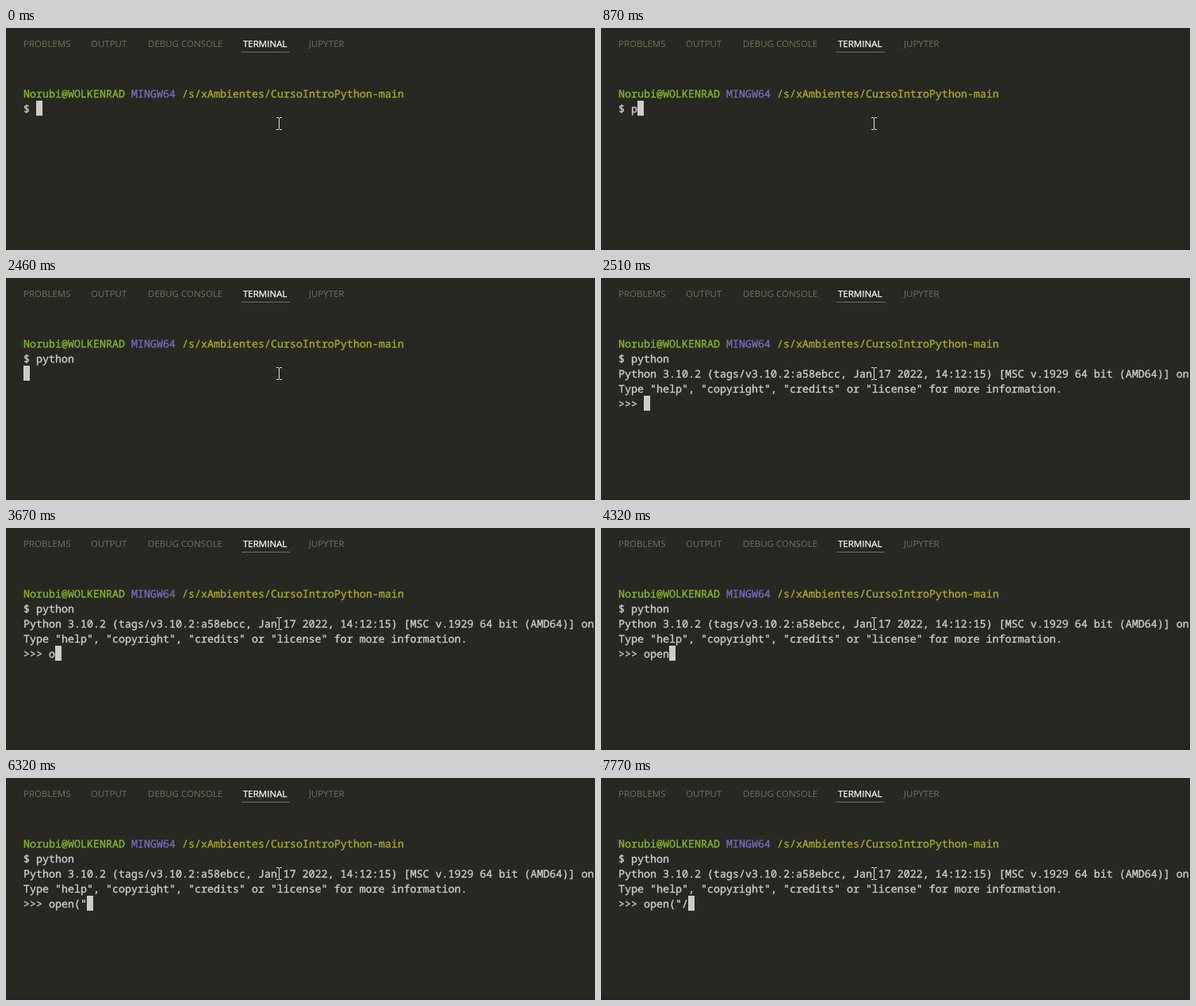
Recreate the animation shown at these times as an HTML page. Size 743 by 281 pixels, loop 8000 ms.

```html
<!DOCTYPE html>
<html lang="en">
<head>
<meta charset="utf-8">
<title>Terminal session</title>
<style>
  html, body { margin: 0; width: 100%; height: 100%; overflow: hidden; background: #272822; }
  svg { display: block; width: 743px; height: 281px; }
  text { fill: currentColor; stroke: currentColor; stroke-width: 0; }
  .tabs { font: 11.5px "Open Sans", "Noto Sans", sans-serif; color: #786e57; }
  .tabs .active { color: #fff; stroke-width: .25px; }
  .term { font: 500 13.3333px "Noto Sans Mono", "DejaVu Sans Mono", monospace; color: #ccc;
          font-variant-ligatures: none; text-rendering: geometricPrecision; }
  .term text { stroke-width: .35px; }
  .user { color: #86b42b; }
  .system { color: #7c68b8; }
  .path { color: #a6a82a; }
</style>
</head>
<body>
<svg viewBox="0 0 743 281">
  <rect width="743" height="281" fill="#272822"/>
  <rect y="280" width="743" height="1" fill="#20211c"/>
  <g class="tabs" id="tabs"></g>
  <rect x="297" y="30" width="61" height="1" fill="#786e57"/>
  <g class="term" id="term"></g>
  <rect id="caret" width="8" height="19" fill="#ccc"/>
  <path d="M341 113.5h3M345 113.5h3M344.5 114v14M341 128.5h3M345 128.5h3" stroke="#e0e0e0" fill="none"/>
</svg>
<script>
const LOOP = 8000, LEFT = 22, TOP = 73, CELL = 8, ROW = 19;
const byId = id => document.getElementById(id);
const term = byId('term'), caret = byId('caret');

function addText(parent, x, y, content, className = '') {
  const node = document.createElementNS('http://www.w3.org/2000/svg', 'text');
  node.setAttribute('x', x);
  node.setAttribute('y', y);
  node.setAttribute('class', className);
  node.textContent = content;
  return parent.appendChild(node);
}
const print = (col, row, content, className) =>
  addText(term, LEFT + col * CELL, TOP + row * ROW + 15, content, className);

[[22, 'PROBLEMS'], [107, 'OUTPUT'], [179, 'DEBUG CONSOLE'], [299, 'TERMINAL', 'active'], [382, 'JUPYTER']]
  .forEach(([x, label, className]) => addText(byId('tabs'), x, 24, label, className));

print(0, 0, 'Norubi@WOLKENRAD', 'user');
print(17, 0, 'MINGW64', 'system');
print(25, 0, '/s/xAmbientes/CursoIntroPython-main', 'path');
print(0, 1, '$');
const command = print(2, 1, '');
const output = [
  print(0, 2, 'Python 3.10.2 (tags/v3.10.2:a58ebcc, Jan 17 2022, 14:12:15) [MSC v.1929 64 bit (AMD64)] on'),
  print(0, 3, 'Type "help", "copyright", "credits" or "license" for more information.'),
  print(0, 4, '>>>')
];
const expression = print(4, 4, '');

// Time of each key press, in ms
const commandKeys = [870, 1270, 1470, 1520, 1630, 1730];
const expressionKeys = [3670, 3730, 4190, 4320, 5920, 6320, 7770];
const ENTER = 2460, READY = 2510;

function type(node, content, keys, t) {
  const count = keys.filter(k => k <= t).length;
  node.textContent = content.slice(0, count);
  return count;
}

function draw(t) {
  const a = type(command, 'python', commandKeys, t);
  const b = type(expression, 'open("/', expressionKeys, t);
  output.forEach(line => line.style.visibility = t >= READY ? 'visible' : 'hidden');
  const [col, row] = t < ENTER ? [2 + a, 1] : t < READY ? [0, 2] : [4 + b, 4];
  caret.setAttribute('x', LEFT + col * CELL);
  caret.setAttribute('y', TOP + row * ROW);
}

const start = performance.now();
function tick() {
  draw((performance.now() - start) % LOOP);
  requestAnimationFrame(tick);
}
tick();
</script>
</body>
</html>
```
